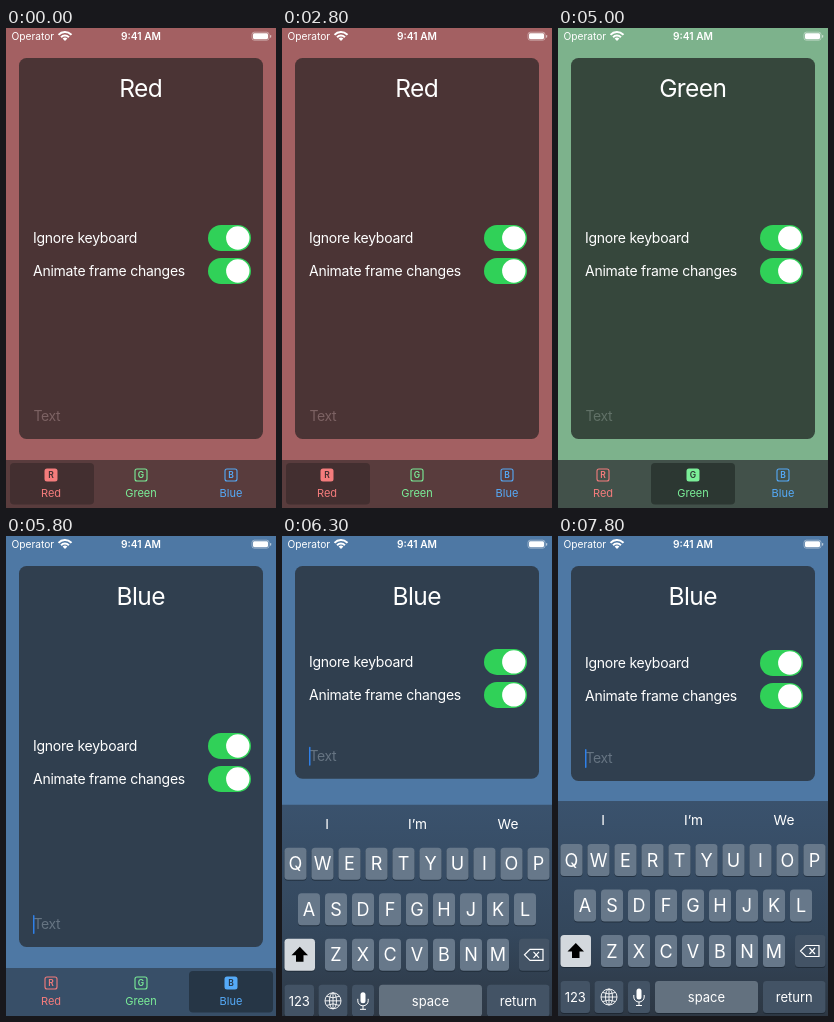
Recreate the animation shown at these times as an HTML page with a canvas. Size 270 by 480 pixels, loop 8 s.

```html
<!DOCTYPE html>
<html>
<head>
<meta charset="utf-8">
<style>
html, body { margin: 0; width: 100%; height: 100%; overflow: hidden; background: #a36062; }
canvas { display: block; width: 270px; height: 480px; }
</style>
</head>
<body>
<canvas id="stage"></canvas>
<script>
const canvas = document.getElementById('stage');
const ctx = canvas.getContext('2d');
const scale = window.devicePixelRatio || 1;
canvas.width = 270 * scale;
canvas.height = 480 * scale;

const LOOP = 8000, GREEN_AT = 3000, BLUE_AT = 5100, FOCUS_AT = 5700, KEYBOARD_AT = 5950;

const themes = [
  { name: 'Red', tint: '#f47c7c', bg: '#a36062', card: '#4b3435', bar: '#593c3d', pick: '#432f30', hint: '#7c6263' },
  { name: 'Green', tint: '#7bee98', bg: '#7db28c', card: '#36473c', bar: '#42514a', pick: '#2c3732', hint: '#617167' },
  { name: 'Blue', tint: '#55aaf8', bg: '#4e78a4', card: '#303f4f', bar: '#384f68', pick: '#263646', hint: '#667482' }
];

function box(x, y, w, h, r, color) {
  ctx.beginPath();
  ctx.roundRect(x, y, w, h, r);
  ctx.fillStyle = color;
  ctx.fill();
}

// Text is centred vertically on y by its cap height.
function text(str, x, y, size, color = '#fff', align = 'center', weight = 400, spacing = 0) {
  ctx.font = `${weight} ${size}px Inter, Roboto, sans-serif`;
  ctx.letterSpacing = spacing + 'px';
  ctx.textAlign = align;
  ctx.fillStyle = color;
  ctx.fillText(str, x, y + size * 0.363);
}

function line(path, color = '#fff', width = 1) {
  ctx.strokeStyle = color;
  ctx.lineWidth = width;
  ctx.stroke(new Path2D(path));
}

function statusBar() {
  text('Operator', 5.5, 8.7, 10.2, '#fff', 'left');
  for (const r of [10.2, 6.7]) {
    ctx.beginPath();
    ctx.arc(59, 13, r - 1.3, -Math.PI * 0.76, -Math.PI * 0.24);
    ctx.strokeStyle = '#fff';
    ctx.lineWidth = 2;
    ctx.stroke();
  }
  ctx.fillStyle = '#fff';
  ctx.fill(new Path2D('M59 13L56.6 10.4Q59 8.7 61.4 10.4Z'));
  text('9:41 AM', 135, 8.7, 10.2, '#fff', 'center', 600);
  ctx.beginPath();
  ctx.roundRect(246, 4.2, 17, 8, 2.3);
  ctx.strokeStyle = 'rgba(255,255,255,.5)';
  ctx.lineWidth = 0.8;
  ctx.stroke();
  box(247, 5.2, 15, 6, 1.4, '#fff');
  box(264, 6.9, 1.2, 2.8, 0.6, 'rgba(255,255,255,.6)');
}

function toggleRow(label, y) {
  text(label, 27, y, 14, '#fff', 'left', 400, -0.25);
  box(202, y - 13, 43, 26, 13, '#30d158');
  ctx.beginPath();
  ctx.arc(231.8, y, 11.7, 0, 7);
  ctx.fillStyle = '#fff';
  ctx.fill();
}

function card(theme, bottom, caret) {
  box(13, 30, 244, bottom - 30, 7.5, theme.card);
  text(theme.name, 134.7, 60, 24.5, '#fff', 'center', 400, -0.6);
  const mid = (30 + bottom) / 2;
  toggleRow('Ignore keyboard', mid - 10.5);
  toggleRow('Animate frame changes', mid + 22.5);
  text('Text', 27.5, bottom - 23, 14, theme.hint, 'left', 400, -0.4);
  ctx.globalAlpha = caret;
  box(27, bottom - 32, 1.5, 19, 0.7, '#2f80e8');
  ctx.globalAlpha = 1;
}

function tabBar(active) {
  const { bar, pick } = themes[active];
  box(0, 432, 270, 48, 0, bar);
  themes.forEach(({ name, tint }, i) => {
    const x = 45 + 90 * i;
    const on = i === active;
    if (on) box([4, 93, 183][i], 435, 84, 41.5, 4, pick);
    if (on) box(x - 6.5, 440.5, 13, 13, 2.5, tint);
    else {
      ctx.beginPath();
      ctx.roundRect(x - 6, 441, 12, 12, 2);
      ctx.strokeStyle = tint;
      ctx.lineWidth = 1.1;
      ctx.stroke();
    }
    text(name[0], x, 447, 8.5, on ? pick : tint, 'center', 600);
    text(name, x, 465, 11, tint);
  });
}

function key(label, x, y, w, color = '#67788a', size = 18) {
  box(x, y + 1, w, 32, 3.5, 'rgba(15,24,34,.5)');
  box(x, y, w, 32, 3.5, color);
  text(label, x + w / 2, y + 16, size);
}

function keyboard(top) {
  const dark = '#435365';
  ctx.save();
  ctx.translate(0, top - 265);
  const shade = ctx.createLinearGradient(0, 265, 0, 480);
  shade.addColorStop(0, '#3a526d');
  shade.addColorStop(0.6, '#34475c');
  shade.addColorStop(1, '#2d3743');
  box(0, 265, 270, 215, 0, shade);
  ['I', 'I’m', 'We'].forEach((word, i) => text(word, 45 + 90.5 * i, 284.5, 13.7));

  [['QWERTYUIOP', 2.5, 308], ['ASDFGHJKL', 16, 353.5], ['ZXCVBNM', 43, 399]].forEach(([row, x, y]) =>
    [...row].forEach((letter, i) => key(letter, x + 27 * i, y, 22)));

  key('', 2.5, 399, 30.5, '#d3d8dd');
  ctx.fillStyle = '#000';
  ctx.fill(new Path2D('M17.8 407L26 415.5H21.5V422H14V415.5H9.5Z'));
  key('', 237, 399, 30.5, dark);
  line('M248 409.5H261V420.5H248L242.5 415ZM251.5 412L257 418M257 412L251.5 418', '#fff', 1.2);

  key('123', 2.5, 445, 29.5, dark, 13);
  key('', 36.5, 445, 29, dark);
  line('M43 461a8 8 0 1 0 16 0a8 8 0 1 0 -16 0M47.5 461a3.5 8 0 1 0 7 0a3.5 8 0 1 0 -7 0'
    + 'M51 453V469M43 461H59M45 456.5Q51 459.5 57 456.5M45 465.5Q51 462.5 57 465.5', '#fff', 0.9);
  key('', 70, 445, 22, dark);
  box(78.5, 452.5, 5, 11, 2.5, '#fff');
  line('M75.8 459V461a5.2 5 0 0 0 10.4 0V459M81 466V469.5M78 469.5H84', '#fff', 1);
  key('space', 97, 445, 103, '#63717f', 13);
  key('return', 205, 445, 62.5, dark, 13);
  ctx.restore();
}

function caretAlpha(t) {
  if (t < FOCUS_AT) return 0;
  if (t < 5800) return 1;
  const phase = (t - 5800) % 1000;
  return phase < 600 ? 1 : Math.max(0, 1 - (phase - 600) / 100);
}

function draw(t) {
  const active = t < GREEN_AT ? 0 : t < BLUE_AT ? 1 : 2;
  const s = Math.max(0, t - KEYBOARD_AT) / 1000;
  // The card settles with a small overshoot; the keyboard has none.
  const cardLeft = Math.exp(-12.4 * s) * (Math.cos(9 * s) + 12.4 / 9 * Math.sin(9 * s));
  const keysLeft = Math.exp(-17 * s) * (1 + 17 * s);

  ctx.setTransform(scale, 0, 0, scale, 0, 0);
  box(0, 0, 270, 480, 0, themes[active].bg);
  statusBar();
  card(themes[active], 245 + 166 * cardLeft, caretAlpha(t));
  tabBar(active);
  if (s > 0) keyboard(265 + 215 * keysLeft);
}

const start = performance.now();
function frame() {
  draw((performance.now() - start) % LOOP);
  requestAnimationFrame(frame);
}
frame();
</script>
</body>
</html>
```
